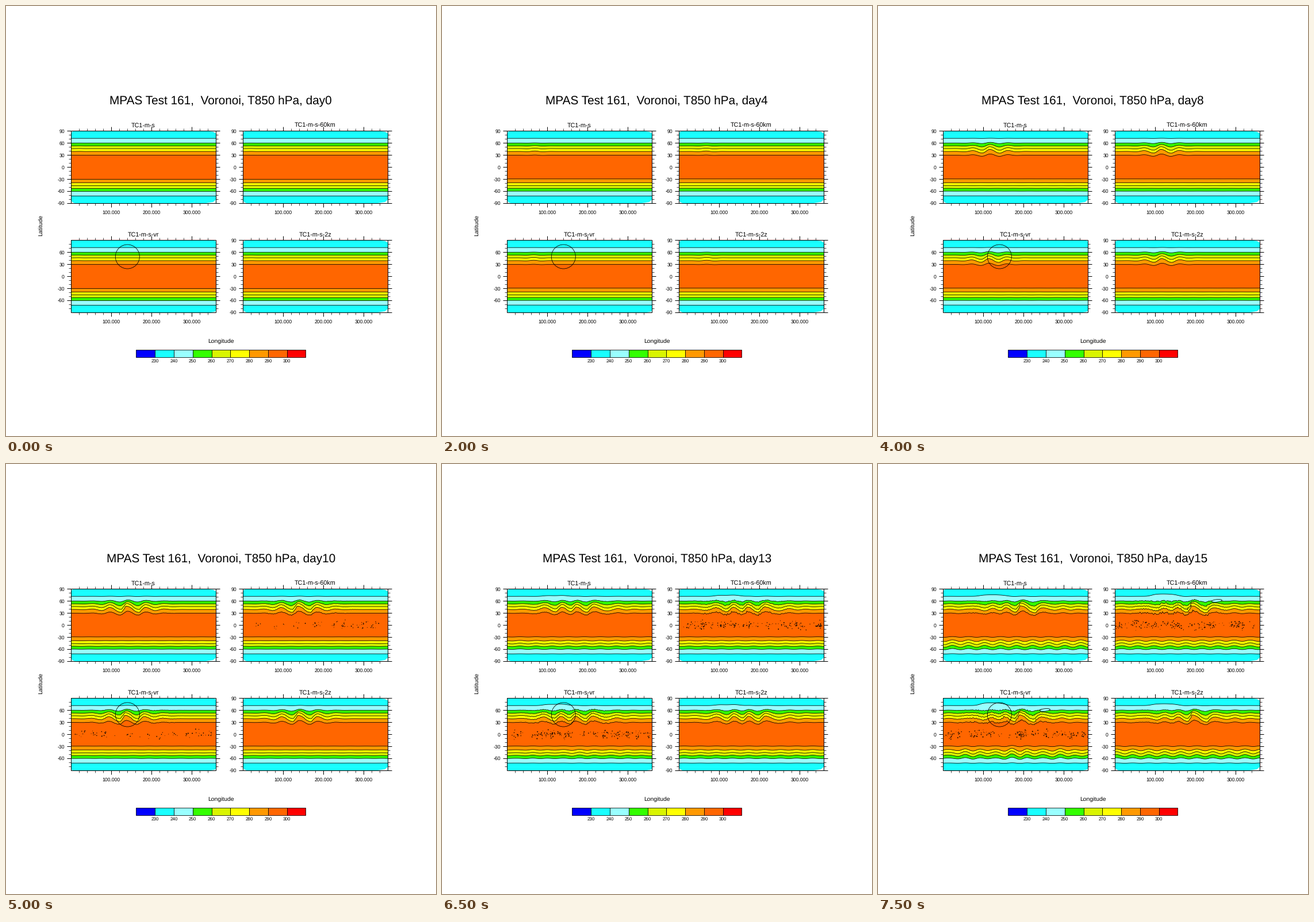
Write a matplotlib script that moves like this. It is 748 by 748 pixels and loops after 8000 ms.

```python
import numpy as np
import matplotlib.pyplot as plt
from matplotlib.animation import FuncAnimation
from matplotlib.patches import Circle, Ellipse, Polygon, Rectangle

plt.rcParams["text.hinting"] = "none"

SIZE, DPI = 748, 64
PT = 72 / DPI              # points per pixel
W, H = 251.3, 125.6        # panel size in pixels
DAYS = 16
TAU = 2 * np.pi

COLORS = ["#0000ff", "#19ffff", "#99ffff", "#33ff00", "#d9f500",
          "#ffff00", "#ff9900", "#ff6600", "#ff0000"]
TITLES = ["TC1-m-s", "TC1-m-s-60km", "TC1-m-s-vr", "TC1-m-s-2z"]
ROUGH = [0.35, 1.0, 0.9, 0.3]        # small-scale noise of each panel
AUSTRAL = [1.8, 1.3, 3.2, 1.8]       # southern wave on the last day
POLAR = [2.6, 4.0, 4.6, 3.0]         # bulge of the northernmost isotherm
NOISY = (1, 2)                       # panels with specks at the equator

# Distance of the isotherms from the equator, pole to tropics.
DIST = [50.0, 41.9, 37.0, 32.1, 27.2, 20.6]

X = np.linspace(-20, W + 20, 900)


def corner(n):
    row, col = divmod(n, 2)
    return 113.4 + 299 * col, 217.4 + 190 * row


def weight(dist):
    """The eddies are strongest in mid-latitudes."""
    return np.exp(-((dist - 29) / 12) ** 2)


def ripple(x, day, seed, low, high):
    rng = np.random.default_rng(seed)
    waves = rng.uniform(low, high, 8)
    phases = rng.uniform(0, TAU, 8)
    return sum(np.sin(TAU * k * x / W + p + 0.8 * day)
               for k, p in zip(waves, phases)) / 3


def wave_packet(x, day):
    """Growing, spreading and eastward moving baroclinic wave."""
    t = day - 6
    amp = 6.5 * np.tanh(0.27 * np.exp(0.42 * t))
    center = 67 + 8.3 * t
    width = 20 * np.exp(0.145 * t)
    late = np.clip((day - 10) / 4, 0, 1)
    phase = TAU * (x - 65 - 8.6 * t) / 32 + 0.8 * late * np.sin(TAU * x / 110)
    wave = (1 - 0.45 * late) * np.cos(phase)
    wave += 0.3 * late * ripple(x, day, 5, 3, 11)
    return amp * np.exp(-((x - center) / width) ** 2 / 1.6) * wave


def lean(y, d):
    """Shift an isotherm by d; warm tongues lean west, cold ones east."""
    return X - 0.1 * d * abs(d), y - d


def northern(n, day):
    wave = wave_packet(X + n % 3, day)
    late = np.clip((day - 8) / 6, 0, 1.1)
    window = np.exp(-((X - 110) / 75) ** 4)
    for k, dist in enumerate(DIST):
        d = weight(dist) * wave
        if k:
            size = ROUGH[n] * late * (1.0 if k == 5 else 0.55)
            d = d + size * window * ripple(X, day, 10 * n + k, 18, 75)
        else:
            bulge = POLAR[n] * np.clip((day - 11) / 4, 0, 1)
            d = d + bulge * np.exp(-((X - 86) / 24) ** 4)
        yield lean(H / 2 - dist, d)


def southern(n, day):
    size = AUSTRAL[n] * np.exp(0.5 * (day - 15))
    wave = np.sin(TAU * 9 * X / W + 0.7 * day + n)
    if n == 2:
        wave = 0.7 * wave + 0.4 * ripple(X, day, 3, 5, 14)
    for dist in reversed(DIST):
        yield lean(H / 2 + dist, weight(dist - 4) * size * wave)


def specks(n, day):
    """Tiny closed contours scattered along the equator."""
    if n not in NOISY or day < 9:
        return np.empty((0, 2)), np.empty(0)
    rng = np.random.default_rng(100 * n + day)
    count = min(70 + 42 * (day - 10), 190)
    centers = rng.uniform(4, W - 4, 55)
    x = rng.choice(centers, count) + rng.normal(0, 3, count)
    y = H / 2 + np.clip(rng.normal(0, 3.5, count), -9, 9)
    sizes = rng.uniform(0.6, 1.7, count)
    return np.column_stack([x, y]), (sizes * PT) ** 2


fig = plt.figure(figsize=(SIZE / DPI, SIZE / DPI), dpi=DPI, facecolor="white")
ax = fig.add_axes([0, 0, 1, 1])
ax.set_xlim(0, SIZE)
ax.set_ylim(SIZE, 0)
ax.axis("off")


def text(x, y, s, px, ha="center", va="baseline", **kw):
    return ax.text(x, y, s, fontsize=px * PT, family="Liberation Sans",
                   ha=ha, va=va, zorder=9, **kw)


def line(x0, y0, x1, y1, width):
    ax.plot([x0, x1], [y0, y1], color="black", lw=width * PT, zorder=8,
            solid_capstyle="butt")


def tick_style(major):
    return (7, 1.0) if major else (4, 0.7)


def draw_axes(n, left, top):
    right, bottom = left + W, top + H
    ax.add_patch(Rectangle((left, top), W, H, fill=False, ec="black",
                           lw=PT, zorder=8))
    for lon in range(20, 360, 20):
        major = lon % 100 == 0
        size, width = tick_style(major)
        x = left + lon * W / 360
        line(x, top - size, x, top, width)
        line(x, bottom, x, bottom + size, width)
        if major:
            text(x, bottom + 18.8, f"{lon}.000", 8.6)
    edge = 80 if n == 2 else 90
    for lat in range(-edge, edge + 1, 10):
        major = lat % 30 == 0
        size, width = tick_style(major)
        y = top + (90 - lat) * H / 180
        line(left - size, y, left, y, width)
        line(right, y, right + size, y, width)
        if major:
            text(left - 11.5, y + 3.3, str(lat), 8.6, "right")
    text(left + W / 2, top - 6.2, TITLES[n], 10.7)


def draw_corners(n, left, top):
    """White gaps where the mesh does not reach the panel corners."""
    scale = 0.5 if n == 2 else 1
    for right in (0, 1):
        for low in (0, 1):
            a = scale * (17 if right else 6)
            b = scale * (6 if low else 4)
            cut = np.array([(0, 0), (0, b), (a / 4, b / 3), (a, 0)])
            cut *= (1 - 2 * right, 1 - 2 * low)
            cut += (left + W * right, top + H * low)
            ax.add_patch(Polygon(cut, fc="white", lw=0, zorder=7))


bands, dots, pools = [], [], []
for n in range(4):
    left, top = corner(n)
    frame = Rectangle((left, top), W, H, fc=COLORS[1], lw=0, zorder=1)
    ax.add_patch(frame)
    row = []
    for color in [*range(2, 8), *range(6, 0, -1)]:
        band = Polygon([(0, 0), (1, 1), (1, 0)], fc=COLORS[color], ec="black",
                       lw=0.8 * PT, zorder=2)
        ax.add_patch(band)
        band.set_clip_path(frame)
        row.append(band)
    bands.append(row)
    cloud = ax.scatter([], [], c="black", marker="D", linewidths=0, zorder=4)
    cloud.set_clip_path(frame)
    dots.append(cloud)
    if n in NOISY:
        pool = Ellipse((left + 177, top + 20.5), 18, 4.5, angle=-6,
                       fc=COLORS[2], ec="black", lw=0.8 * PT, zorder=3)
        pools.append(ax.add_patch(pool))
    draw_corners(n, left, top)
    draw_axes(n, left, top)

ax.add_patch(Circle((211.3, 436), 21, fill=False, ec="black", lw=0.8 * PT, zorder=6))

text(60, 381.5, "Latitude", 10.4, va="center", rotation=90)
text(373.8, 586, "Longitude", 10.4)
heading = text(373.8, 170.3, "", 20.7)

CELL = 295 / 9
for i, color in enumerate(COLORS):
    x = 226.4 + i * CELL
    ax.add_patch(Rectangle((x, 598.4), CELL, 12.2, fc=color, ec="black",
                           lw=0.8 * PT, zorder=5))
    if i:
        text(x, 620.2, str(220 + 10 * i), 8)


def update(day):
    heading.set_text(f"MPAS Test 161,  Voronoi, T850 hPa, day{day}")
    for n in range(4):
        left, top = corner(n)
        curves = [*northern(n, day), *southern(n, day)]
        for band, (x, y) in zip(bands[n], curves):
            xs = np.r_[x, W + 40, W + 40, -40, -40]
            ys = np.r_[y, y[-1], H + 20, H + 20, y[0]]
            band.set_xy(np.column_stack([xs + left, ys + top]))
        points, sizes = specks(n, day)
        dots[n].set_offsets(points + (left, top))
        dots[n].set_sizes(sizes)
    for pool in pools:
        pool.set_visible(day >= 14)
    return []


anim = FuncAnimation(fig, update, frames=DAYS, interval=500, repeat=True,
                     repeat_delay=0, blit=False)
plt.show()
```
